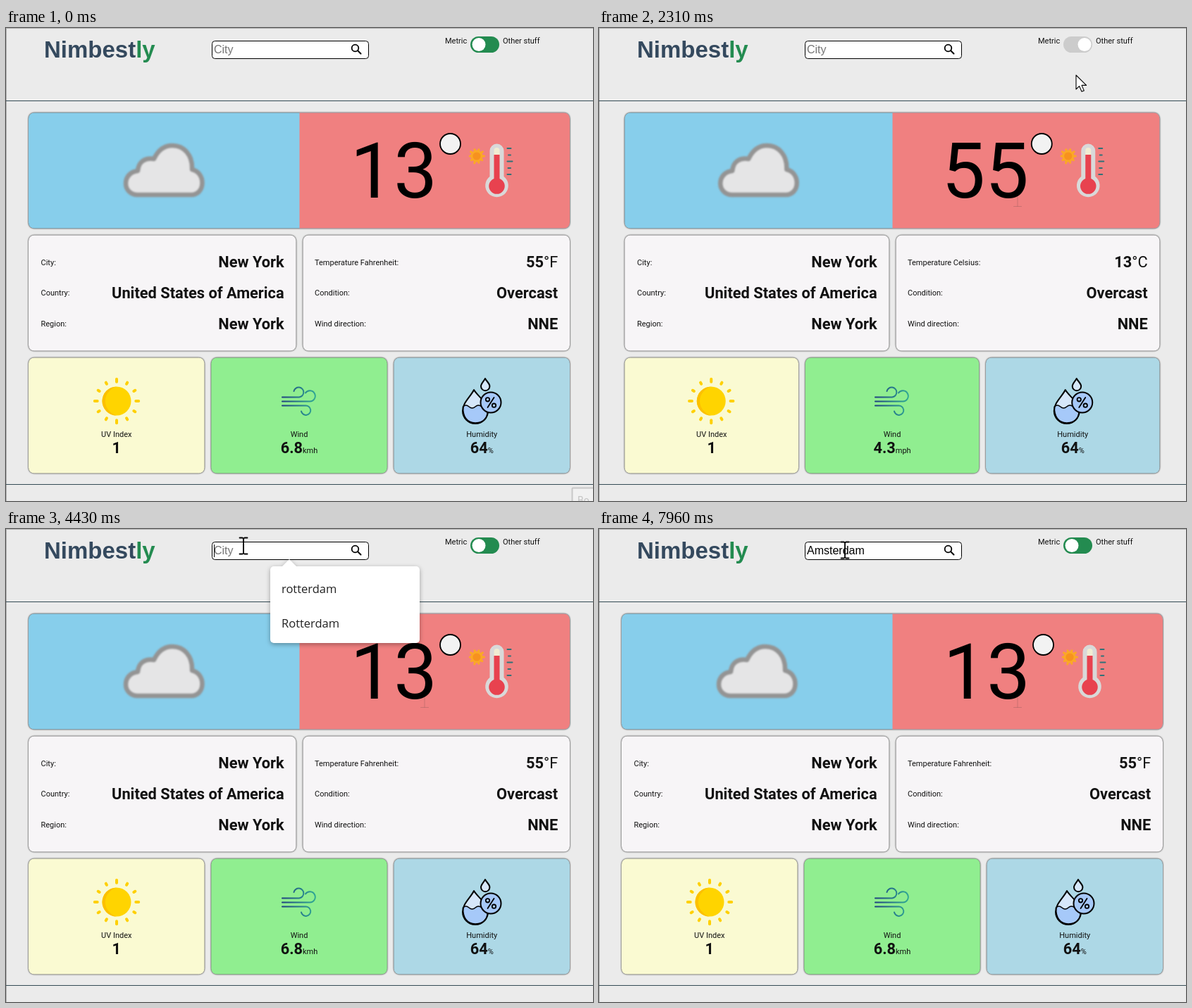
These frames come from a looping animation (833x672 px, 8000 ms). An HTML page:

```html
<!DOCTYPE html>
<html lang="en">
<head>
<meta charset="utf-8">
<title>Weather dashboard</title>
<style>
html, body { margin: 0; width: 100%; height: 100%; overflow: hidden; background: #ebebeb; }
svg { display: block; width: 833px; height: 672px; font: 11px Roboto, sans-serif; }
.card { filter: drop-shadow(0 0 1.3px #000); }
.val { font-size: 21.8px; font-weight: bold; }
.thin { font-weight: 400; }
.unit { font-size: 11px; font-weight: 400; }
.end { text-anchor: end; }
.mid { text-anchor: middle; }
.field { font: 16px "Liberation Sans", Arial, sans-serif; }
.logo { font: bold 33px "Liberation Sans", Arial, sans-serif; }
.menu { font: 16.5px "Open Sans", sans-serif; fill: #222; }
</style>
</head>
<body>
<svg id="stage" viewBox="0 0 833 672"></svg>
<script>
const stage = document.getElementById('stage');
const LOOP = 8000, GREEN = [35, 139, 80], GREY = [204, 204, 204];

// Each entry changes part of the state at the given time and holds it.
const steps = [
  [0, { tip: 1, toggle: 0, imperial: false, text: '', cursor: null, caret: false, menu: false, ghost: false }],
  [100, { tip: .4 }],
  [190, { tip: 0, cursor: ['arrow', 690, 295] }],
  [550, { cursor: ['beam', 594, 244] }],
  [910, { cursor: ['arrow', 671, 58], ghost: true }],
  [1260, { cursor: ['arrow', 687, 42] }],
  [1610, { cursor: ['arrow', 685, 39], imperial: true, toggle: .12 }],
  [1960, { toggle: .95 }],
  [2310, { toggle: 1, cursor: ['arrow', 677, 67] }],
  [2670, { cursor: ['arrow', 674.5, 57] }],
  [3030, { cursor: ['hand', 669, 22] }],
  [3380, { cursor: ['hand', 669, 19] }],
  [3730, { imperial: false, toggle: .88 }],
  [4080, { toggle: 0, cursor: ['arrow', 350.5, 73.5] }],
  [4430, { cursor: ['beam', 337, 24], menu: true, caret: true }],
  [4790, { cursor: ['beam', 349, 30] }],
  [5150, { caret: false }],
  [5850, { text: 'Ams', menu: false, caret: true }],
  [6550, { text: 'Amsterd' }],
  [6900, { text: 'Amsterda' }],
  [7250, { text: 'Amsterdam' }],
  [7960, { caret: false }]
];

const text = (x, y, s, cls = '', fill = '#111') =>
  `<text x="${x}" y="${y}" class="${cls}" fill="${fill}">${s}</text>`;
const path = (d, fill = 'none', stroke = 'none', width = 1) =>
  `<path d="${d}" fill="${fill}" stroke="${stroke}" stroke-width="${width}" stroke-linecap="round" stroke-linejoin="round"/>`;
const circle = (x, y, r, fill, stroke = 'none', width = 1) =>
  `<circle cx="${x}" cy="${y}" r="${r}" fill="${fill}" stroke="${stroke}" stroke-width="${width}"/>`;
const rect = (x, y, w, h, rx, fill, extra = '') =>
  `<rect x="${x}" y="${y}" width="${w}" height="${h}" rx="${rx}" fill="${fill}" ${extra}/>`;
const card = (x, y, w, fill) => rect(x, y, w, 164, 8, fill, 'class="card"');
const shift = (dx, s) => `<g transform="translate(${dx} 0)">${s}</g>`;

function rays(cx, cy, count, from, to, color, width) {
  let s = '';
  for (let i = 0; i < count; i++) {
    const a = i * 2 * Math.PI / count, cut = i % 3 ? .8 : 0;
    const at = r => `${cx + r * Math.cos(a)} ${cy + r * Math.sin(a)}`;
    s += path(`M${at(from + cut)}L${at(to - cut)}`, 'none', color, width);
  }
  return s;
}

const cloud = '<g style="filter:blur(.9px)">' + path(
  'M187 237C176 237 170 229 170 221C170 211 177 204 187 203C188 190 197 184 210 186C216 173 224 167 236 167' +
  'C253 167 265 181 264 201C273 203 278.5 211 278.5 220C278.5 230 272 237 263 237Z', '#e5e5e6', '#949494', 6.5) + '</g>';

const thermometer =
  rays(668, 182, 10, 7, 10.5, '#fba826', 3) + circle(668, 182, 8.6, '#fba826') + circle(668, 182, 5.6, '#f7921e') +
  path('M686.5 174.5a10 10 0 0 1 20 0V211a16.3 16.3 0 1 1-20 0Z', '#d9d9d9') +
  path('M692.5 181V174a4 4 0 0 1 8 0V181Z', '#f1ecd2') +
  path('M692.5 180H700.5V214a11.3 11.3 0 1 1-8 0Z', '#e8424f') +
  path('M711.5 171H716.5M713 180.5H716M711.5 189.5H718.5M712.5 199H716M711.5 208H716.5', 'none', '#2f7278', 2);

const sun = rays(157, 530, 12, 27.3, 31.2, '#ffd000', 4) + circle(157, 530, 20.5, '#ffd400') +
  path('M157 509.5a20.5 20.5 0 0 0 0 41a20.5 20.5 0 0 1-10-6a20 20 0 0 1 0-29a20.5 20.5 0 0 1 10-6Z', '#fcc000');

const wind = `<linearGradient id="breeze" gradientUnits="userSpaceOnUse" x1="391" x2="440" y1="0" y2="0">
  <stop stop-color="#1f3f80"/><stop offset="1" stop-color="#30ab95"/></linearGradient>` +
  path('M392 524.5H416A7 7 0 1 0 408.5 516M392 530.5H431A7.6 7.6 0 1 0 425 518.5M392 536.5H425A6.7 6.7 0 1 1 419 544.5',
    'none', 'url(#breeze)', 2);

const drop = 'M664 514C660 523 648 532 648 544A18 18 0 0 0 684 544C684 532 669 523 664 514Z';
const humidity =
  path(drop, '#d6e7fa') +
  path('M648.5 538q4-4 8.5 0t9 0t9 0t8 0Q686 561 666 561Q648 560 648.5 538Z', '#a6c9f9', '#000', 1.6) +
  path(drop, 'none', '#000', 2) +
  path('M680 498C678 502 674 505 674 509A6.2 6.2 0 0 0 686.4 509C686.4 505 682 502 680 498Z', '#d6e7fa', '#000', 2) +
  circle(688, 532, 14.5, '#a6c8f8', '#000', 2) +
  circle(683.5, 527.8, 2.7, 'none', '#000', 1.8) + circle(692.5, 536.2, 2.7, 'none', '#000', 1.8) +
  path('M692.5 525L683.5 539', 'none', '#000', 1.8);

const cursors = {
  arrow: path('M0 0V20L4.6 15.6L8 23.3L11.3 21.9L8 14.4H14.6Z', '#fff', '#000', 1.1),
  hand: path('M7 3C7 .2 11.5 .2 11.5 3V10C11.5 8 15 8 15 10.5C15 8.8 18.3 8.8 18.3 11.5C18.3 10 21.5 10 21.5 13V19' +
    'C21.5 22 19.5 24 19.5 27.5H9.5C9.5 25 2.500 18.5 1.500 16C.8 13 4.500 12.5 7 16Z', '#fff', '#000', 1.2) +
    path('M11.5 10V14M15 11V14.5M18.3 12V15', 'none', '#000', 1),
  beam: path('M-5.5-11.5H-1.5L0-10.5L1.5-11.5H5.5M0-10.5V10.5M-5.5 11.5H-1.5L0 10.5L1.5 11.5H5.5', 'none', '#000', 1.8)
};

function header(s) {
  const rgb = GREEN.map((c, i) => Math.round(c + (GREY[i] - c) * s.toggle));
  return rect(0, 0, 833, 1, 0, '#b0b0b0') + rect(0, 0, 1, 672, 0, '#b0b0b0') +
    rect(0, 103, 833, 1, 0, '#344b55') + rect(0, 648, 833, 1, 0, '#344b55') +
    text(54, 42, 'Nimbest<tspan fill="#238b50">ly</tspan>', 'logo', '#34495e') +
    rect(292.5, 18.5, 222, 25, 4, '#fff', 'stroke="#000"') +
    text(295, 36, s.text || 'City', 'field', s.text ? '#000' : '#757575') +
    circle(495.5, 28.5, 4.8, 'none', '#000', 1.8) + path('M499 32L503.5 36.5', 'none', '#000', 2) +
    text(623, 22, 'Metric') + text(705, 22, 'Other stuff') +
    rect(659, 12, 41, 23, 11.5, `rgb(${rgb})`) + circle(671 + 18 * s.toggle, 23.5, 9.5, '#fff');
}

function panels(s) {
  const e = s.imperial ? 4.5 : 0, half = e / 2;
  const left = 32 + e, right = 800 - e, gap = 9.7;
  const w = (right - left - 2 * gap) / 3, x2 = left + w + gap, x3 = x2 + w + gap;
  const unit = s.imperial ? 'C' : 'F';
  const row = (y, a, va, b, vb) =>
    text(left + 17.5, y - 3.7, a) + text(394.7, y, va, 'val end') +
    text(438, y - 3.7, b) + text(right - 16.8, y, vb, 'val end');
  const stat = (x, name, value, u) => text(x, 580.5, name, 'mid') +
    text(x, 604, `${value}<tspan class="unit">${u}</tspan>`, 'val mid');

  return card(left, 120.5, right - left, '#87ceeb') +
    path(`M416.5 120.5H${right - 8}a8 8 0 0 1 8 8v148a8 8 0 0 1-8 8H416.5Z`, '#f08080') +
    shift(half, cloud) +
    shift(-half, `<text x="488.5" y="240.8" font-size="110">${s.imperial ? 55 : 13}</text>` +
      circle(630.5, 164.5, 14.5, '#f2f2f2', '#000', 1.8) + thermometer) +
    card(left, 294.5, 411.5 - left, '#f7f5f7') + card(421.5, 294.5, right - 421.5, '#f7f5f7') +
    row(340.4, 'City:', 'New York', `Temperature ${s.imperial ? 'Celsius' : 'Fahrenheit'}:`,
      `${s.imperial ? 13 : 55}<tspan class="thin">°${unit}</tspan>`) +
    row(384, 'Country:', 'United States of America', 'Condition:', 'Overcast') +
    row(427.6, 'Region:', 'New York', 'Wind direction:', 'NNE') +
    card(left, 468.5, w, '#fafad2') + card(x2, 468.5, w, '#90ee90') + card(x3, 468.5, w, '#add8e6') +
    shift(half, sun) + wind + shift(-half, humidity) +
    stat(left + w / 2, 'UV Index', 1, '') +
    stat(416, 'Wind', s.imperial ? 4.3 : 6.8, s.imperial ? 'mph' : 'kmh') +
    stat(x3 + w / 2, 'Humidity', 64, '%');
}

function overlay(s) {
  let out = '';
  if (s.ghost) out += `<g opacity=".2">${path('M588.5 253.5H599.5M594 240V253', 'none', '#333', 1)}</g>`;
  if (s.menu) out += '<g style="filter:drop-shadow(0 2px 3px #0005)">' +
    path('M391 54L402 43L413 54Z', '#fff') + rect(375, 53, 212, 109, 5, '#fff') + '</g>' +
    text(391, 91, 'rotterdam', 'menu') + text(391, 139.5, 'Rotterdam', 'menu');
  if (s.tip) out += `<g opacity="${s.tip}">` +
    rect(803.5, 653.5, 60, 40, 1, '#f1f1f1', 'stroke="#c8c8c8" stroke-width="2"') +
    `<text x="811" y="676" font-size="14" fill="#c4c4c4">Bo</text></g>`;
  if (s.caret) {
    const end = s.text ? stage.querySelector('.field').getComputedTextLength() : 0;
    out += rect(Math.round(295 + end), 22, 1, 18, 0, '#000');
  }
  if (s.cursor) {
    const [kind, x, y] = s.cursor;
    out += `<g transform="translate(${x} ${y})">${cursors[kind]}</g>`;
  }
  return out;
}

const start = performance.now();
let shown = 0;
function frame(now) {
  const t = Math.max(0, now - start) % LOOP;
  const count = steps.filter(([at]) => at <= t).length;
  if (count !== shown) {
    shown = count;
    const state = Object.assign({}, ...steps.slice(0, count).map(step => step[1]));
    stage.innerHTML = header(state) + panels(state);
    stage.insertAdjacentHTML('beforeend', overlay(state));
  }
  requestAnimationFrame(frame);
}
frame(start);
</script>
</body>
</html>
```
